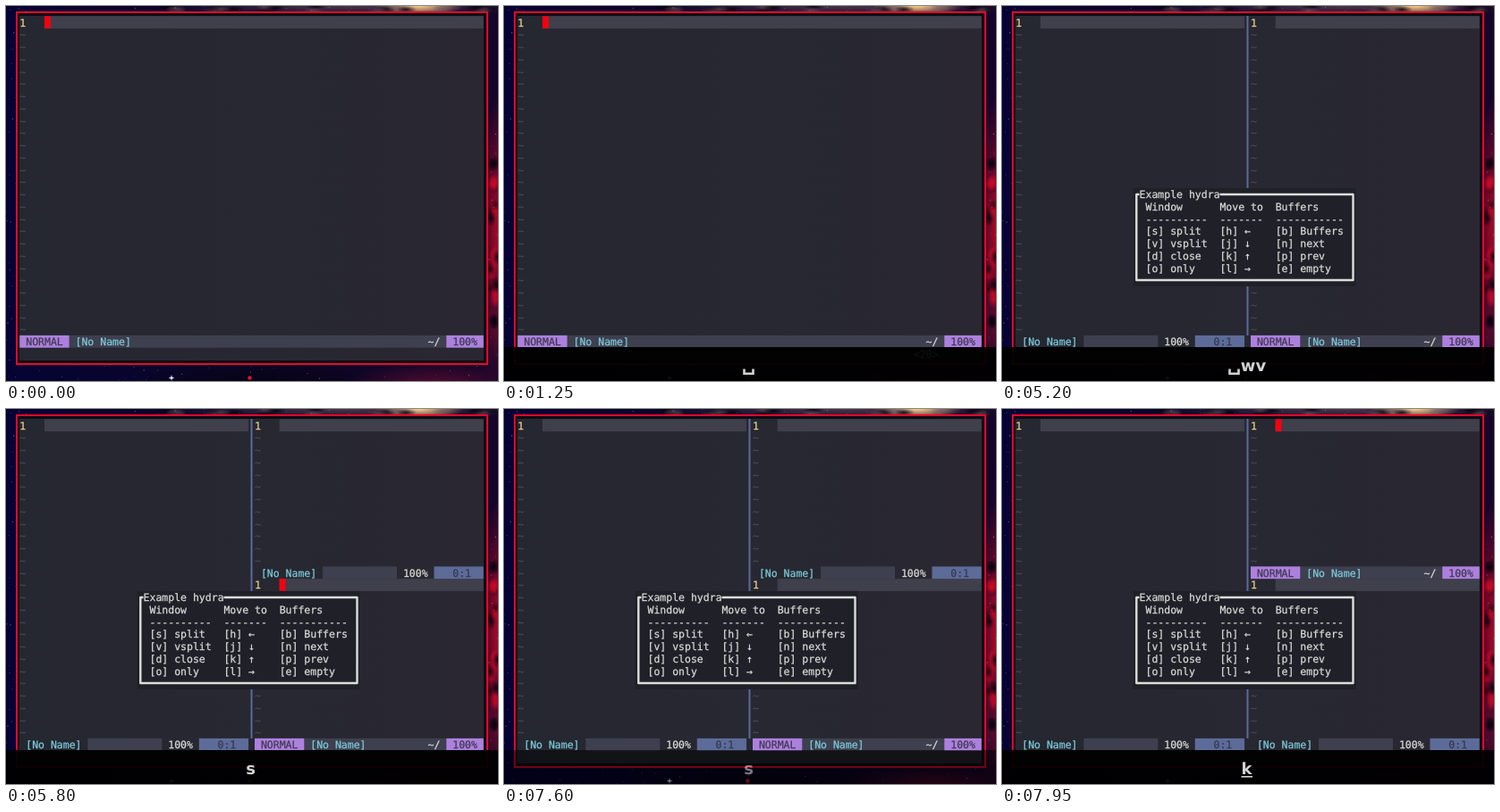
Recreate the animation shown at these times as an HTML page. Size 550 by 420 pixels, loop 8 s.

```html
<!DOCTYPE html>
<html lang="en">
<head>
<meta charset="utf-8">
<title>Window hydra</title>
<style>
  html, body { margin: 0; width: 100%; height: 100%; overflow: hidden; background: #07041c; }
  svg { display: block; width: 550px; height: 420px; }
  text { white-space: pre; text-rendering: geometricPrecision; }
  .term { font: 11.5px "DejaVu Sans Mono", monospace; stroke-width: .25px; }
  .keys { font: bold 18px "DejaVu Sans", sans-serif; fill: #d2d2d2; text-anchor: middle; }
</style>
</head>
<body>
<svg id="stage" viewBox="0 0 550 420" xmlns="http://www.w3.org/2000/svg"></svg>
<script>
const LOOP = 8000;
const CW = 6.913, RH = 13.75, X0 = 15.3, Y0 = 11.4;
const C = {
  line: '#3f404c', fill: '#3e3f4f', num: '#ecd08c', tilde: '#484a56',
  purple: '#ad80de', blue: '#5d6b99', cyan: '#7ccad8', text: '#d9d9d6', ink: '#403a52',
  cursor: '#f5000f', popup: '#1f2028', frame: '#dcdedb', key: '#d2d2d2'
};

const x = col => +(X0 + col * CW).toFixed(2);
const y = row => +(Y0 + row * RH).toFixed(2);
const esc = s => s.replace(/&/g, '&amp;').replace(/</g, '&lt;');
const rect = (l, t, w, h, fill, more = '') =>
  `<rect x="${l}" y="${t}" width="${w}" height="${h}" fill="${fill}" ${more}/>`;
const cells = (col, row, n, fill, rows = 1) =>
  rect(x(col), y(row), (n * CW).toFixed(2), rows * RH, fill);
const put = (col, row, s, fill = C.text, more = '') =>
  `<text class="term" x="${x(col)}" y="${(y(row) + 11.3).toFixed(2)}" fill="${fill}" stroke="${fill}" ${more}>${esc(s)}</text>`;
const group = (id, body) => `<g id="${id}">${body}</g>`;

// An empty buffer: current line, then tildes down to its status row
function pane(col, row, width, rows) {
  let out = cells(col + 4, row, width - 4, C.line) + put(col, row, '1', C.num, 'font-weight="bold"');
  for (let i = 1; i < rows; i++) out += put(col, row + i, '~', C.tilde);
  return out;
}

function activeStatus(col, row) {
  return cells(col, row, 75 - col, C.fill) +
    cells(col, row, 8, C.purple) + put(col + 1, row, 'NORMAL', C.ink) +
    put(col + 9, row, '[No Name]', C.cyan) + put(66, row, '~/') +
    cells(69, row, 6, C.purple) + put(70, row, '100%', C.ink);
}

function idleStatus(col, row) {
  return put(col + 1, row, '[No Name]', C.cyan) +
    cells(col + 11, row, 12, C.fill) + put(col + 24, row, '100%') +
    cells(col + 29, row, 8, C.blue) + put(col + 32, row, '0:1', '#343a52');
}

function hydra() {
  const rows = [
    ['Window', 'Move to', 'Buffers'],
    ['-'.repeat(10), '-'.repeat(7), '-'.repeat(11)],
    ['[s] split', '[h] ←', '[b] Buffers'],
    ['[v] vsplit', '[j] ↓', '[n] next'],
    ['[d] close', '[k] ↑', '[p] prev'],
    ['[o] only', '[l] →', '[e] empty']
  ];
  const cols = [21, 33, 42];
  const body = rows.map((r, i) => r.map((s, j) => put(cols[j], 15 + i, s)).join('')).join('');
  return cells(19, 14, 36, C.popup, 8) +
    `<path d="M153.5 211H150.3V307H392.5V211H243.5" fill="none" stroke="${C.frame}" stroke-width="2.4" stroke-linejoin="round"/>` +
    put(20, 14, 'Example hydra') + body;
}

function random(seed) {
  return () => (seed = (seed * 16807) % 2147483647) / 2147483647;
}

function wallpaper() {
  const rnd = random(77);
  const glow = (cx, cy, rx, ry, id) =>
    `<ellipse cx="${cx.toFixed(1)}" cy="${cy.toFixed(1)}" rx="${rx}" ry="${ry}" fill="url(#${id})"/>`;
  const fade = (id, color, a) => `<radialGradient id="${id}"><stop stop-color="${color}" stop-opacity="${a}"/>` +
    `<stop offset="1" stop-color="${color}" stop-opacity="0"/></radialGradient>`;
  let out = `<defs>
    <linearGradient id="sky"><stop stop-color="#060334"/><stop offset=".4" stop-color="#0a0528"/><stop offset="1" stop-color="#16052a"/></linearGradient>
    <linearGradient id="glass"><stop stop-color="#252731"/><stop offset=".5" stop-color="#272831"/><stop offset="1" stop-color="#2a2731"/></linearGradient>
    ${fade('red', '#c80a26', 0.9)}${fade('gold', '#ffd08a', 1)}${fade('plum', '#5c0c2c', 0.8)}
    ${fade('dust', '#6c5560', 0.6)}${fade('night', '#05030f', 0.9)}
    </defs>` + rect(0, 0, 550, 420, 'url(#sky)') +
    glow(290, 425, 150, 30, 'night') + glow(480, 422, 100, 22, 'plum') + glow(380, 0, 210, 14, 'dust') +
    glow(462, 0, 50, 11, 'gold') + glow(552, 250, 24, 150, 'red') + glow(548, 360, 25, 60, 'plum');
  // Mottled clouds along the top and right edges
  for (let i = 0; i < 24; i++) {
    out += glow(180 + rnd() * 360, rnd() * 6, 12, 4, i % 2 ? 'dust' : 'night') +
      glow(541 + rnd() * 9, 175 + rnd() * 180, 6, 9, i % 2 ? 'red' : 'night');
  }
  for (let i = 0; i < 100; i++) {
    const side = rnd(), a = rnd();
    const [px, py] = side < .35 ? [rnd() * 11, a * 420] : side < .5 ? [540 + rnd() * 10, a * 420]
      : side < .75 ? [a * 550, rnd() * 6] : [a * 550, 403 + rnd() * 17];
    out += `<circle cx="${px.toFixed(1)}" cy="${py.toFixed(1)}" r="${(.3 + rnd() * .4).toFixed(2)}" fill="#b9b4e0" opacity="${(.2 + rnd() * .5).toFixed(2)}"/>`;
  }
  return out + '<path d="M185 413.5v6M182 416.5h6" stroke="#8fa6da"/><circle cx="185" cy="416.5" r="1.5" fill="#eef4ff"/>' +
    '<circle cx="272.5" cy="416.5" r="2.2" fill="#e0152e"/>';
}

const space = cx =>
  `<path d="M${cx - 5} 406.5V411.8H${cx + 5}V406.5" fill="none" stroke="${C.key}" stroke-width="2.6"/>`;
const keys = (cx, s) => `<text class="keys" x="${cx}" y="409">${s}</text>`;

document.getElementById('stage').innerHTML =
  wallpaper() +
  rect(12, 7, 526, 394, '#0c0c15', 'stroke="#ee0828" stroke-width="2"') +
  rect(15, 11, 519, 386, 'url(#glass)') +
  group('single', pane(0, 0, 75, 26) + activeStatus(0, 26)) +
  group('pending', put(64, 27, '<20>')) +
  group('left', pane(0, 0, 37, 26) + idleStatus(0, 26) + rect(273.5, 11, 2, 358, '#5c6a9b')) +
  group('whole', pane(38, 0, 37, 26) + activeStatus(38, 26)) +
  group('split', pane(38, 0, 37, 12) + pane(38, 13, 37, 13)) +
  group('lower', idleStatus(38, 12) + activeStatus(38, 26)) +
  group('upper', activeStatus(38, 12) + idleStatus(38, 26)) +
  group('curA', cells(4, 0, 1, C.cursor)) +
  group('curB', cells(42, 0, 1, C.cursor)) +
  group('curC', cells(42, 13, 1, C.cursor)) +
  group('hydra', hydra()) +
  group('bar', rect(0, 382, 550, 38, '#000', 'opacity=".94"') +
    group('keySpace', space(273.5)) +
    group('keyWv', space(259.5) + keys(281, 'wv')) +
    group('keyS', keys(273.5, 's')) +
    group('keyK', keys(273.5, 'k') + rect(267.5, 411, 12.5, 1.6, C.key)));

// Each track lists [time, value]; a value holds until the next entry
const layout = [
  [0, 'single'], [1050, 'single pending'], [3800, 'left whole hydra'],
  [5800, 'left split lower hydra'], [7950, 'left split upper hydra']
];
const cursor = [
  [0, 'curA'], [550, ''], [1050, 'curA'],
  [3800, 'curB'], [4250, ''], [4750, 'curB'], [5200, ''],
  [5800, 'curC'], [6450, ''], [6700, 'curC'], [7200, ''], [7700, 'curC'], [7950, 'curB']
];
const pressed = [[0, 'keySpace'], [3800, 'keyWv'], [5800, 'keyS'], [7950, 'keyK']];
const barAlpha = [
  [0, 0], [1050, .25], [1100, .5], [1150, .75], [1250, 1],
  [7600, .55], [7700, .25], [7800, 0], [7950, 1]
];

const at = (track, t) => track.reduce((v, [start, value]) => t >= start ? value : v, track[0][1]);
const layers = [...document.querySelectorAll('g')].filter(g => g.id !== 'bar');
const bar = document.getElementById('bar');
const begin = performance.now();

function draw(now) {
  const t = Math.max(0, now - begin) % LOOP;
  const on = [at(layout, t), at(cursor, t), at(pressed, t)].join(' ').split(' ');
  for (const g of layers) g.style.display = on.includes(g.id) ? '' : 'none';
  bar.style.opacity = at(barAlpha, t);
  requestAnimationFrame(draw);
}
draw(begin);
</script>
</body>
</html>
```
